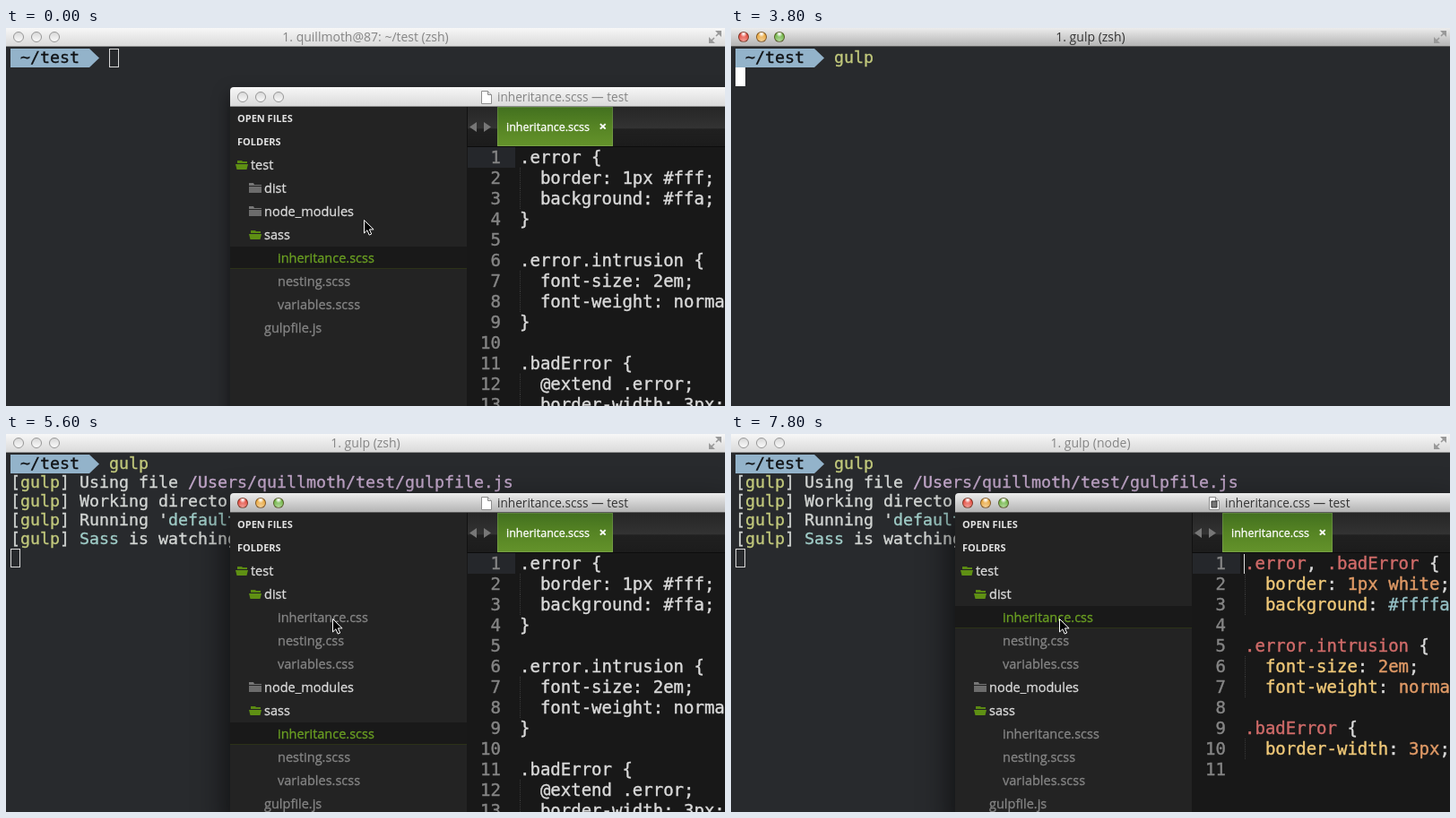
Animation, 802 px wide and 422 px high, one loop 8 s. Source, as an HTML page:

```html
<!DOCTYPE html>
<html lang="en">
<head>
<meta charset="utf-8">
<title>Terminal and editor</title>
<style>
html, body { margin: 0; width: 100%; height: 100%; overflow: hidden; background: #282a2d; }
#stage { position: relative; width: 802px; height: 422px; overflow: hidden; background: #282a2d;
  font-family: "Open Sans", "Noto Sans", sans-serif; }
#stage * { box-sizing: border-box; }
#stage div, #stage svg, #stage i { position: absolute; }
.row, .line, .num { white-space: pre; }

.bar { left: 0; right: 0; top: 0; background: linear-gradient(#f7f7f7, #dadada); border-bottom: 1px solid #8e8e8e; }
.on > .bar { background: linear-gradient(#ececec, #b4b4b4); border-color: #5c5c5c; }
.title { white-space: pre; color: #858585; line-height: 20px; }
.on > .title { color: #333; }
.light { width: 12px; height: 12px; border-radius: 50%; border: 1px solid #969696;
  background: linear-gradient(#d9d9d9, #fafafa); }
.on > .light { border-color: rgba(60, 30, 10, .6);
  background: radial-gradient(circle at 50% 15%, #fff 5%, transparent 38%),
    radial-gradient(circle at 50% 90%, color-mix(in srgb, var(--c) 55%, #fff), var(--c) 75%); }

#term { inset: 0; }
#term > .bar { height: 21px; }
#term > .title { left: 0; right: 0; top: 0; text-align: center; font-size: 14px; }
#rows, #prompt { font: 18.27px/21px "DejaVu Sans Mono", monospace; -webkit-text-stroke: .35px; }
#rows { top: -1px; color: #d2d5d3; }
#prompt { left: 5px; top: 23px; width: 99px; height: 21px; padding-left: 11px; line-height: 19px;
  background: #93b3ca; color: #101214; clip-path: polygon(0 0, 88px 0, 100% 50%, 88px 100%, 0 100%); }
.y { color: #c2c97c } .m { color: #c2a7ca } .c { color: #9fccc7 }
#block { width: 11px; height: 21px; border: 1px solid #d8d8d8; }
.on > #block { background: #fff; border: 0; }
.on > #block.soft { background: #d2d2d2; }

#editor { left: 250px; top: 66px; width: 560px; height: 370px; background: #181818; border-radius: 4px 4px 0 0;
  box-shadow: 0 8px 18px rgba(0, 0, 0, .55); }
#editor.on { box-shadow: 0 16px 38px rgba(0, 0, 0, .75); }
#editor > .bar { height: 22px; border-radius: 4px 4px 0 0; }
#editor > .title { top: 1px; font-size: 13.65px; }
#side { left: 0; top: 22px; width: 264px; height: 348px; background: #232323; }
.head { left: 8px; font-weight: 700; font-size: 11px; line-height: 20px; color: #e2e2e2; white-space: pre; }
.row { left: 0; width: 264px; height: 26px; line-height: 25px; font-size: 14.5px; color: #dadada;
  -webkit-text-stroke: .3px; }
.row.file { color: #858585; }
.row.pick { height: 25px; color: #6a9e22; background: #191919; border-bottom: 1px solid #2c3218; }
.row svg { top: 7px; }
#tabs { left: 264px; top: 22px; width: 296px; height: 45px; border-left: 1px solid #111; border-bottom: 1px solid #0c0c0c;
  background: linear-gradient(#262626, #333 55%, #202020 56%, #1c1c1c); }
#tab { left: 33px; top: 0; height: 44px; padding-left: 10px; line-height: 45px; font-size: 12.5px; color: #fff;
  background: linear-gradient(#42701f, #568424 50%, #64932b); white-space: pre;
  box-shadow: inset 0 0 0 1px rgba(255, 255, 255, .12); -webkit-text-stroke: .3px; }
#tab b { position: absolute; right: 7px; top: -1px; font-size: 15px; }
#code { left: 265px; top: 67px; width: 295px; height: 303px; overflow: hidden;
  font: 19px/23px "DejaVu Sans Mono", monospace; color: #dadada; -webkit-text-stroke: .4px; }
#code .num { left: 0; width: 37px; text-align: right; color: #858585; }
#code .line { left: 58px; }
#code .now { left: 0; top: 0; width: 53px; height: 23px; background: #25272b; }
#code .guide { left: 58px; width: 0; height: 23px; border-left: 1px dotted #3a3a3a; }
#caret { left: 57px; top: 1px; width: 1px; height: 22px; background: #ddd; }
.sel { color: #d06b69 } .prop { color: #efc878 } .val { color: #e09a66 } .hex { color: #93bfc4 }
</style>
</head>
<body>
<div id="stage">
  <div id="term">
    <div class="bar"></div>
    <div class="title"></div>
    <svg style="left:784px;top:3px" width="14" height="14" fill="#999" stroke="#999" stroke-width="1.600">
      <path d="M8 6L11 3M6 8L3 11"/><path stroke="none" d="M7 0h7v7zM0 7v7h7z"/>
    </svg>
    <div id="rows"></div>
    <div id="prompt">~/test</div>
    <div id="block"></div>
  </div>
  <div id="editor">
    <div class="bar"></div>
    <svg id="doc" style="top:4px" width="12" height="15">
      <path d="M.5.5h7l4 4v10H.5z" fill="#fff" stroke="#8d8d8d"/><path d="M7.5.5v4h4" fill="#ddd" stroke="#8d8d8d"/>
      <path id="mark" d="M3 5h6v7H3z" fill="#777" stroke="#333"/>
    </svg>
    <div class="title"></div>
    <div id="side"></div>
    <div id="tabs">
      <svg style="left:2px;top:17px" width="24" height="11" fill="#777"><path d="M8 0v11L0 5.500zM16 0v11l8-5.500z"/></svg>
      <div id="tab"></div>
    </div>
    <div id="code"></div>
  </div>
  <svg id="mouse" width="14" height="20" style="overflow:visible">
    <path d="M.5.5v14.500l3.400-3.200 2.300 5.300 2.500-1.100-2.300-5.100h4.700z" fill="#000" stroke="#fff"/>
  </svg>
</div>
<script>
const LOOP = 8000, STEP = 200, USER = "quillmoth";
const $ = s => document.querySelector(s);
const span = (cls, text) => `<span class="${cls}">${text}</span>`;

for (const [win, y] of [["#term", 4], ["#editor", 5]])
  ["#e2493f", "#e9a83a", "#6fb543"].forEach((color, i) =>
    $(win).insertAdjacentHTML("beforeend",
      `<i class="light" style="left:${8 + 20 * i}px;top:${y}px;--c:${color}"></i>`));

const log = [
  "Using file " + span("m", `/Users/${USER}/test/gulpfile.js`),
  "Working directory changed to " + span("m", `/Users/${USER}/test`),
  `Running '${span("c", "default")}'...`,
  span("c", "Sass") + " is watching"
].map(text => `[${span("y", "gulp")}] ${text}`);

const scss = `.error {
  border: 1px #fff;
  background: #ffa;
}

.error.intrusion {
  font-size: 2em;
  font-weight: normal;
}

.badError {
  @extend .error;
  border-width: 3px;
}`.split("\n");

const css = `.error, .badError {
  border: 1px white;
  background: #ffffaa; }

.error.intrusion {
  font-size: 2em;
  font-weight: normal; }

.badError {
  border-width: 3px; }
`.split("\n");

function highlight(line) {
  const rule = line.match(/^  ([\w-]+): (.*?);(.*)$/);
  if (!rule) return line.replace(/\.[\w.]+/g, s => span("sel", s));
  const values = rule[2].split(" ").map(v => span(v[0] === "#" ? "hex" : "val", v));
  return `  ${span("prop", rule[1])}: ${values.join(" ")};${rule[3]}`;
}

function codeView(lines, colored) {
  return `<div class="now"></div>` + lines.map((line, i) => {
    const top = `style="top:${23 * i}px"`;
    return `<div class="num" ${top}>${i + 1}</div>` +
      (line.startsWith(" ") ? `<div class="guide" ${top}></div>` : "") +
      `<div class="line" ${top}>${colored ? highlight(line) : line}</div>`;
  }).join("") + (colored ? `<div id="caret"></div>` : "");
}

function folder(x, open) {
  const shape = open
    ? `<path d="M2 4V1h5l1 1h5v2z" fill="#5b8a12"/><path d="M0 5h14l-1.500 6h-11z" fill="#5f9014"/>`
    : `<path d="M0 0h5l1 2h8v1H0z" fill="#777"/><path d="M0 4h14v7H0z" fill="#6c6c6c"/>`;
  return `<svg style="left:${x}px" width="14" height="11">${shape}</svg>`;
}

function sideView(distOpen, built, picked) {
  const names = ["inheritance", "nesting", "variables"];
  const files = ext => names.map(n => [53, `${n}.${ext}`]);
  const rows = [[23, "test", true], [38, "dist", distOpen], ...(built ? files("css") : []),
    [38, "node_modules", false], [38, "sass", true], ...files("scss"), [38, "gulpfile.js"]];
  const head = (y, text) => `<div class="head" style="top:${y}px">${text}</div>`;
  return head(3, "OPEN FILES") + head(29, "FOLDERS") + rows.map(([x, name, open], i) => {
    const cls = open === undefined ? "file" : "";
    return `<div class="row ${cls} ${name === picked ? "pick" : ""}" style="top:${52 + 26 * i}px;padding-left:${x}px">` +
      (cls ? "" : folder(x - 17, open)) + name + "</div>";
  }).join("");
}

// time, x, y
const path = [[0, 399, 214], [200, 390, 208], [600, 282, 179], [800, 278, 179], [1400, 187, 106],
  [4800, 187, 106], [5600, 364, 206], [7000, 364, 206], [7200, 366, 206]];

function mouseAt(t) {
  const k = path.findLastIndex(p => p[0] <= t), a = path[k], b = path[k + 1];
  if (!b) return a.slice(1);
  const u = (t - a[0]) / (b[0] - a[0]), e = u * u * (3 - 2 * u);
  return [1, 2].map(i => Math.round(a[i] + (b[i] - a[i]) * e));
}

function drawTerminal(t, front) {
  const typed = "gulp".slice(0, Math.max(0, Math.floor((t - 2400) / 200) + 1));
  const entered = t >= 3600;
  const shown = t < 4000 ? 0 : t < 4200 ? 2 : t < 4400 ? 3 : 4;
  const lines = [span("y", typed), ...log.slice(0, shown)];
  $("#term").className = front ? "on" : "";
  $("#term > .title").textContent = entered ? `1. gulp (${t < 7200 ? "zsh" : "node"})` : `1. ${USER}@87: ~/test (zsh)`;
  $("#rows").innerHTML = lines.map((line, i) =>
    `<div class="line" style="left:${i ? 5 : 115}px;top:${23 + 21 * i}px">${line}</div>`).join("");
  const block = $("#block");
  block.className = t >= 2400 && !entered ? "soft" : "";
  block.style.left = (entered ? 5 : 115 + 11 * typed.length) + "px";
  block.style.top = (entered ? 44 + 21 * shown : 23) + "px";
}

function drawEditor(t, visible) {
  const ed = $("#editor"), isCss = t >= 6200;
  ed.style.display = visible ? "" : "none";
  if (!visible) return;
  const name = "inheritance." + (isCss ? "css" : "scss");
  ed.className = t >= 800 ? "on" : "";
  const title = $("#editor > .title");
  title.textContent = name + " — test";
  title.style.left = (isCss ? 301 : 298) + "px";
  $("#doc").style.left = (isCss ? 283 : 280) + "px";
  $("#mark").style.display = isCss ? "" : "none";
  $("#tab").innerHTML = `${name}<b>×</b>`;
  $("#tab").style.width = (isCss ? 123 : 129) + "px";
  $("#side").innerHTML = sideView(t >= 800, t >= 4600, name);
  $("#code").innerHTML = codeView(isCss ? css : scss, isCss);
}

function draw(t) {
  const front = t >= 1600 && t < 4600;
  drawTerminal(t, front);
  drawEditor(t, !front);
  const mouse = $("#mouse"), [x, y] = mouseAt(t);
  mouse.style.display = t >= 2400 && t < 5000 ? "none" : "";
  mouse.style.left = x + "px";
  mouse.style.top = y + "px";
}

let last = -1;
const start = performance.now();
function tick() {
  const t = Math.floor((performance.now() - start) % LOOP / STEP) * STEP;
  if (t !== last) draw(last = t);
  requestAnimationFrame(tick);
}
tick();
</script>
</body>
</html>
```
